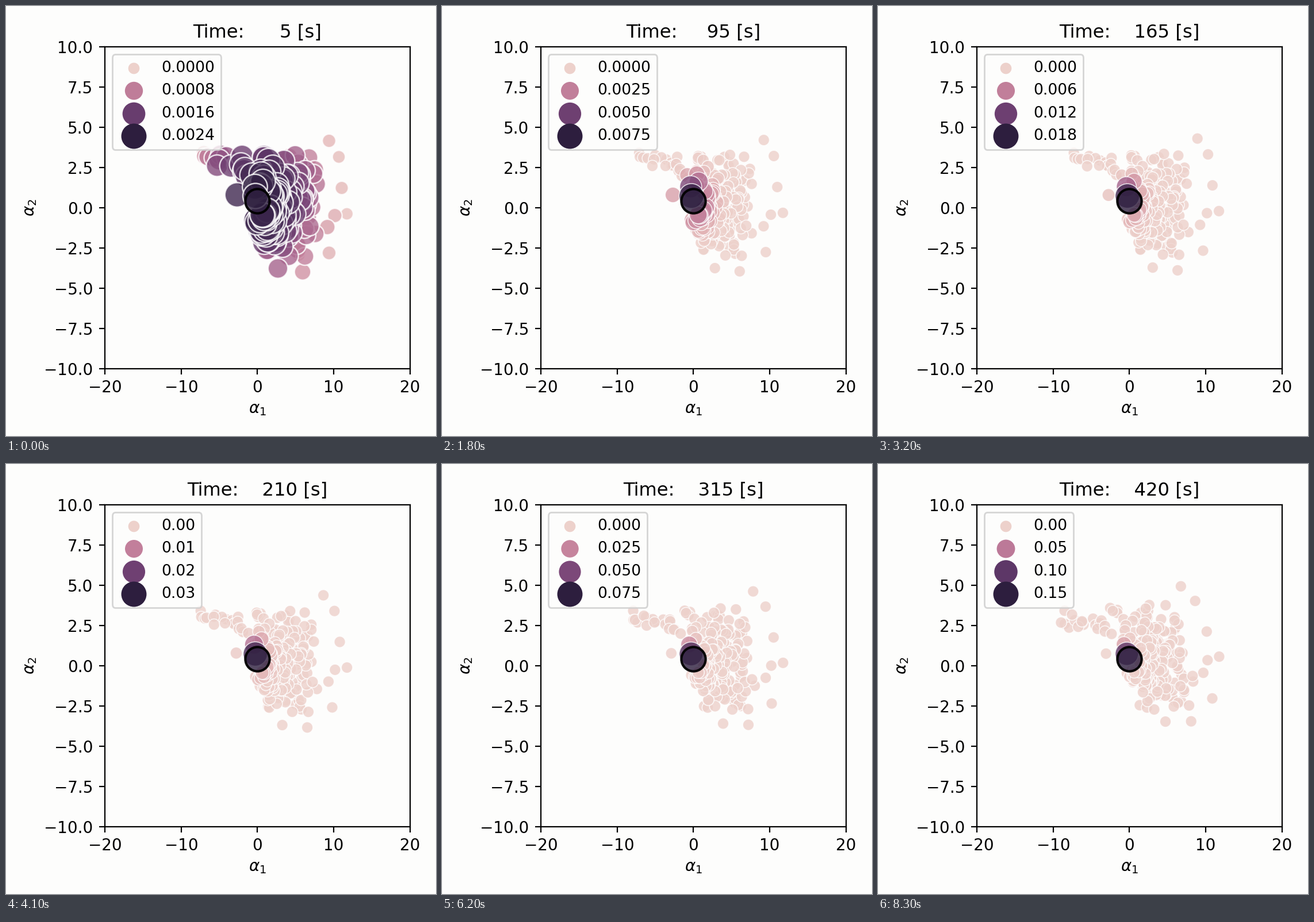
Recreate the animation shown at these times as a matplotlib script. Size 748 by 748 pixels, loop 8.4 s.

```python
import numpy as np
import matplotlib.pyplot as plt
from matplotlib.animation import FuncAnimation
from matplotlib.ticker import MaxNLocator

SIDE, DPI = 748, 200
FRAMES, STEP_MS = 84, 100
LEFT, RIGHT, TOP, BOTTOM = 172.2, 702.7, 71.4, 630.7
CENTRE = np.array([437.0, 338.5])
FLIP = np.array([1, -1])
S_MIN, S_MAX = 50, 250
ALPHA = 0.8
PAPER = "#fdfdfc"

# Key particles as pixel offsets from the optimum (y up)
NEAR = [(-3, 8), (-4, 24), (10, 33), (7, 46), (-35, 10)]
RIM = [(125, 104), (142, 76), (147, 22), (156, -23), (135, -26), (122, -46),
       (125, -91), (83, -97), (79, -124), (36, -118), (100, 54), (101, -58)]


def helix(u):
    """Cubehelix colours from light (u=0) to dark (u=1)."""
    x = 0.85 - 0.7 * np.clip(np.atleast_1d(u), 0, 1)
    amp = 0.8 * x * (1 - x) / 2
    phi = 2 * np.pi * 0.4 * x
    mix = [(-0.14861, 1.78277), (-0.29227, -0.90649), (1.97294, 0.0)]
    rgb = [x + amp * (a * np.cos(phi) + b * np.sin(phi)) for a, b in mix]
    return np.clip(np.stack(rgb, axis=1), 0, 1)


def area(u):
    return S_MIN + (S_MAX - S_MIN) * np.clip(u, 0, 1)


def peak_weight(t):
    """Largest weight, a logistic curve in time."""
    return 0.16 / (1 + np.exp((330 - t) / 75))


def to_data(offset):
    p = CENTRE + offset * FLIP
    x = -20 + 40 * (p[:, 0] - LEFT) / (RIGHT - LEFT)
    y = 10 - 20 * (p[:, 1] - TOP) / (BOTTOM - TOP)
    return np.column_stack([x, y])


def spread(r):
    """Squared distance from the optimum, wider vertically."""
    return (r[:, 0] / 115) ** 2 + (r[:, 1] / 160) ** 2


def sample(rng, count, mean, sd):
    """Gaussian cloud cut to the wedge the particles fill."""
    r = rng.normal(mean, sd, (count * 8, 2))
    x, y = r.T
    keep = (spread(r) < 0.85) & (y < 80) & (y > -97)
    keep &= (x > -18 - 0.4 * y) & (np.hypot(x, y) > 24)
    return r[keep][:count]


def left_arm(rng, count):
    """Strip of particles reaching to the upper left."""
    s = rng.random(count)[:, None]
    return (-92, 72) + s * (70, -6) + rng.normal(0, 9, (count, 2))


def build_cloud():
    rng = np.random.default_rng(12)
    loose = np.vstack([sample(rng, 165, (36, -6), (44, 50)),
                       sample(rng, 60, (18, -32), (14, 25)),
                       left_arm(rng, 14)])
    keys = np.array(NEAR + RIM, float)
    r = np.vstack([loose, keys])
    n = len(loose)

    # Slow shear and rotation, weaker close to the optimum
    drift = np.column_stack([-0.28 * r[:, 1] - 6, 0.15 * r[:, 0] + 3])
    drift[:n] += rng.normal(0, 8, (n, 2))
    drift *= np.minimum(1, np.hypot(*r.T) / 60)[:, None]

    q = spread(r)
    cost = q * (0.8 + 0.35 * q)
    cost[:n] = 0.03 + cost[:n] * (0.75 + rng.exponential(0.7, n))
    order = np.argsort(-cost)
    return r[order], drift[order], cost[order]


START, DRIFT, COST = build_cloud()

fig = plt.figure(figsize=(SIDE / DPI, SIDE / DPI), dpi=DPI, facecolor=PAPER)
ax = fig.add_axes([LEFT / SIDE, 1 - BOTTOM / SIDE,
                   (RIGHT - LEFT) / SIDE, (BOTTOM - TOP) / SIDE],
                  facecolor=PAPER)
ax.set(xlim=(-20, 20), ylim=(-10, 10))
ax.set_xlabel(r"$\alpha_1$", labelpad=3.3)
ax.set_ylabel(r"$\alpha_2$", labelpad=3.5)
ax.set_xticks(np.arange(-20, 21, 10))
ax.set_yticks(np.arange(-10, 10.1, 2.5))
ax.tick_params(axis="y", pad=4)
title = ax.set_title("", fontsize=11.6)

cloud = ax.scatter(*to_data(START).T, edgecolors="white", alpha=ALPHA, zorder=2)
best = ax.scatter(*to_data(np.zeros((1, 2))).T, s=231,
                  facecolors=[(*helix(1)[0], ALPHA)],
                  edgecolors=[(0, 0, 0, 0.95)], linewidths=1.5, zorder=3)
keys = [ax.scatter([], [], linewidths=0) for _ in range(4)]
locator = MaxNLocator(nbins=3)


def update_legend(peak):
    ticks = locator.tick_values(0, peak)[:4]
    step = ticks[1] - ticks[0]
    digits = next(d for d in range(1, 7) if abs(round(step, d) - step) < 1e-9)
    for key, tick in zip(keys, ticks):
        key.set_sizes([area(tick / peak)])
        key.set_facecolor(helix(tick / peak))
    ax.legend(keys, [f"{t:.{digits}f}" for t in ticks], loc="upper left",
              fontsize=9.6, borderaxespad=0.48, facecolor=PAPER)


def draw(i):
    t = 5 * (i + 1)
    progress = (i / (FRAMES - 1)) ** 1.8
    u = np.exp(-COST * t / 5)
    sizes = area(u)
    cloud.set_offsets(to_data(START + DRIFT * progress))
    cloud.set_sizes(sizes)
    cloud.set_facecolor(helix(u))
    cloud.set_linewidth(0.08 * np.sqrt(np.percentile(sizes, 10)))
    update_legend(peak_weight(t))
    title.set_text(f"Time: {t:6d} [s]")
    return cloud, best, title


anim = FuncAnimation(fig, draw, frames=FRAMES, interval=STEP_MS,
                     init_func=lambda: draw(0), repeat=True, repeat_delay=0)
plt.show()
```
